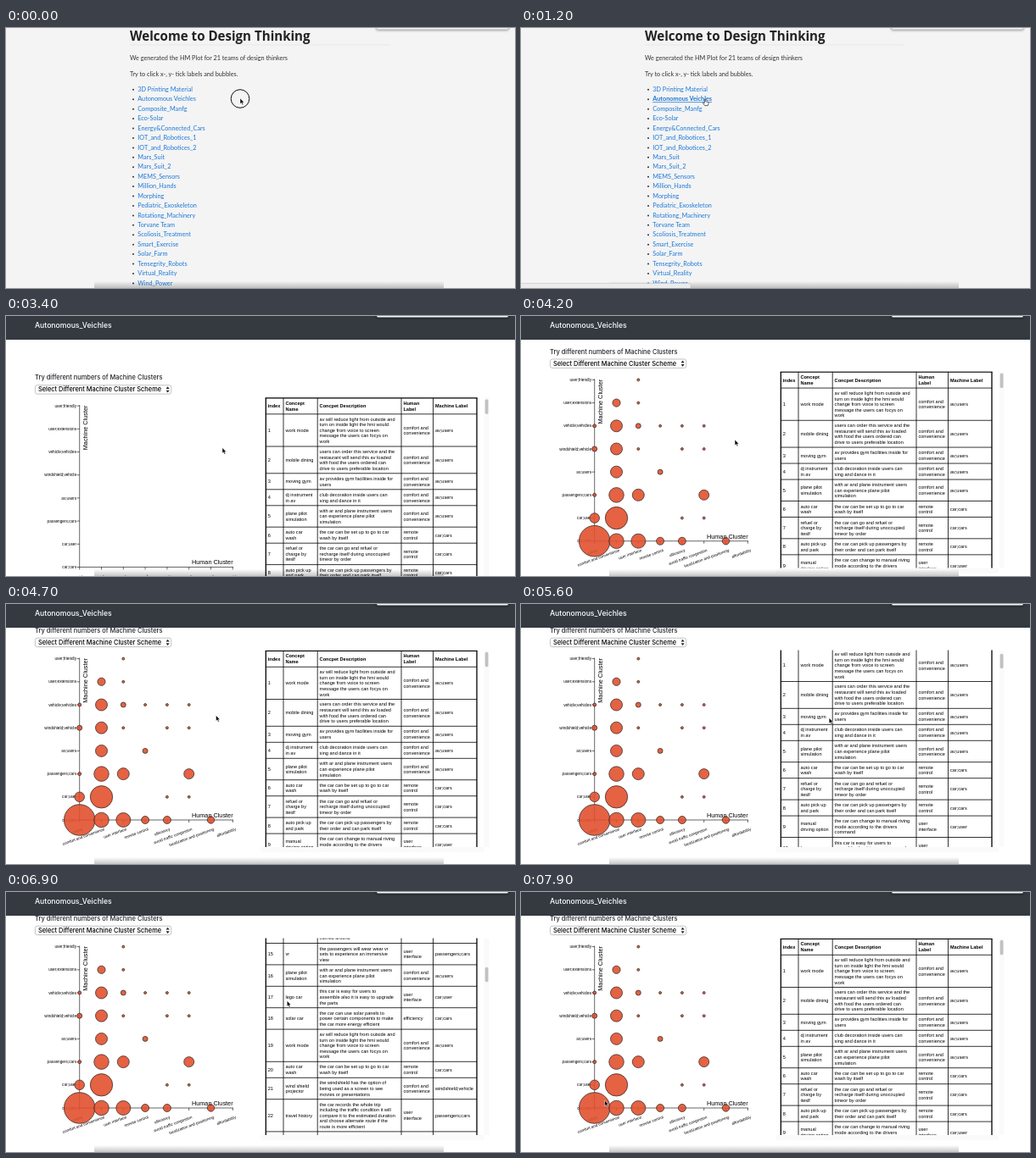
Write an HTML page that moves like this. It is 600 by 307 pixels and loops after 8000 ms.

```html
<!DOCTYPE html>
<html lang="en">
<head>
<meta charset="utf-8">
<title>Design Thinking</title>
<style>
html, body { margin: 0; width: 100%; height: 100%; overflow: hidden; background: #fff; }
svg { display: block; width: 600px; height: 307px; }
text { white-space: pre; }
.lato { font-family: Lato, sans-serif; }
.open { font-family: "Open Sans", sans-serif; }
.inter { font-family: Inter, sans-serif; font-weight: 500; }
.arial { font-family: "Liberation Sans", Arial, sans-serif; }
.bold { font-weight: 700; }
.hover { font-weight: 700; text-decoration: underline; }
</style>
</head>
<body>
<svg id="stage" viewBox="0 0 600 307" xmlns="http://www.w3.org/2000/svg">
  <defs>
    <clipPath id="pane"><rect x="300" y="54.6" width="258" height="232.4"/></clipPath>
    <linearGradient id="dock" x1="0" y1="0" x2="0" y2="1">
      <stop offset="0" stop-color="#000" stop-opacity="0"/>
      <stop offset="1" stop-color="#000" stop-opacity=".22"/>
    </linearGradient>
    <filter id="soft" x="-10%" y="-200%" width="120%" height="500%"><feGaussianBlur stdDeviation="1.6"/></filter>
  </defs>
  <g id="home"></g>
  <g id="detail">
    <rect width="600" height="307" fill="#fff"/>
    <g id="body">
      <g id="chart"></g>
      <g clip-path="url(#pane)"><g id="table"></g></g>
      <rect x="563.5" y="54.6" width="6" height="232.4" fill="#fafafa"/>
      <rect id="thumb" x="564.7" width="3.8" height="17.5" rx="1.9" fill="#c1c1c1"/>
      <rect x="300" y="287" width="263" height="6" fill="#fafafa"/>
    </g>
    <g id="nav"></g>
  </g>
  <rect x="104" y="299" width="412" height="8" fill="url(#dock)"/>
  <rect x="436" y="-6" width="157" height="9" rx="3" fill="#000" opacity=".35" filter="url(#soft)"/>
  <rect x="437" y="-6" width="155" height="7.5" rx="2" fill="#f7f7f7"/>
  <g id="status">
    <rect x="-2" y="301.5" width="202" height="8" rx="1.5" fill="#ececec" stroke="#bbb" stroke-width=".5"/>
  </g>
  <circle id="ring" cx="276" cy="83.5" r="10.8" fill="none" stroke="#111" stroke-width="1"/>
  <g id="cursor">
    <path id="arrow" d="M0 0V6.6L1.5 5.3 2.6 7.8 3.8 7.3 2.7 4.9H4.7Z" fill="#000" stroke="#fff" stroke-width=".5"/>
    <path id="hand" d="M-.7 .4Q0-.7 .7 .4V2.8L3.7 3.5Q4.3 4 4 5.2L3.3 7.6H-.4L-2.6 4.6Q-2.5 3.5-1.5 4L-.7 4.7Z" fill="#fff" stroke="#222" stroke-width=".7"/>
  </g>
</svg>
<script>
const $ = id => document.getElementById(id);
const add = (id, html) => $(id).insertAdjacentHTML('beforeend', html);

// Text whose middle sits on cy.
const text = (str, x, cy, size, cls, color = '#000', extra = '') =>
  `<text x="${x}" y="${(cy + size * 0.35).toFixed(2)}" font-size="${size}" class="${cls}" fill="${color}" ${extra}>${str}</text>`;
const line = (x1, y1, x2, y2, w = 0.6) =>
  `<path d="M${x1} ${y1}L${x2} ${y2}" stroke="#000" stroke-width="${w}" fill="none"/>`;

function buildHome() {
  const teams = ('3D Printing Material,Autonomous Veichles,Composite_Manfg,Eco-Solar,Energy&amp;Connected_Cars,' +
    'IOT_and_Robotices_1,IOT_and_Robotices_2,Mars_Suit,Mars_Suit_2,MEMS_Sensors,Million_Hands,Morphing,' +
    'Pediatric_Exoskeleton,Rotationg_Machinery,Torvane Team,Scoliosis_Treatment,Smart_Exercise,Solar_Farm,' +
    'Tensegrity_Robots,Virtual_Reality,Wind_Power').split(',');
  let out = '<rect width="600" height="307" fill="#f4f4f4"/>' +
    text('Welcome to Design Thinking', 146, 9.3, 15.1, 'open bold', '#222') +
    '<rect x="146" y="19.6" width="306" height=".7" fill="#e2e2e2"/>' +
    text('We generated the HM Plot for 21 teams of design thinkers', 146, 35.2, 7.25, 'lato', '#333') +
    text('Try to click x-, y- tick labels and bubbles.', 146, 54, 7.25, 'lato', '#333');
  teams.forEach((name, i) => {
    const y = 72.4 + i * 11.43;
    out += `<circle cx="150" cy="${y + 0.4}" r="1" fill="#333"/>` +
      text(name, 155.3, y, 7.25, 'lato', '#1b78d8', i === 1 ? 'id="link"' : '');
  });
  add('home', out);
}

const X0 = 86.7, Y0 = 255, DX = 25.8, DY = 27.2;

function buildChart() {
  const rows = ['car;cars', 'car;user', 'passengers;cars', 'av;users', 'windshield;vehicle',
    'vehicle;vehicles', 'user;extensions', 'user;friendly'];
  const cols = ['safety', 'comfort and convenience', 'user interface', 'remote control', 'efficiency',
    'avoid traffic congestion', 'localization and positioning', 'affordability'];
  // Radii per row from the bottom, one per column.
  const sizes = [[18.3, 8.8, 8.5, 4.5, 4.5, 0, 4.2], [5.8, 13.2, 0, 0, 1.5, 1.5], [2, 8.8, 7, 0, 0, 6],
    [0, 7, 0, 3], [3, 7, 1.5, 0, 1.5, 1.5], [2, 7, 3, 1.5, 1.5, 1.5], [0, 4.6, 1.5], [0, 0, 1.5]];
  let out = text('Try different numbers of Machine Clusters', 34, 31.3, 7.45, 'inter', '#212529') +
    '<rect x="34.4" y="40.2" width="160.4" height="10.4" rx="2.4" fill="#fff" stroke="#aaa" stroke-width=".7"/>' +
    text('Select Different Machine Cluster Scheme', 38, 45.3, 7.4, 'inter') +
    '<path d="M188.6 44.6l2-2.8 2 2.8zM188.6 46.2l2 2.8 2-2.8z" fill="#222"/>' +
    line(X0, 63.5, X0, Y0) + line(X0, Y0, 268, Y0);
  rows.forEach((name, i) => {
    const y = Y0 - i * DY;
    out += line(X0 - 3, y, X0, y) + text(name, 83, y, 4.7, 'arial', '#000', 'text-anchor="end"');
  });
  cols.forEach((name, i) => {
    const x = X0 + i * DX;
    out += line(x, Y0, x, Y0 + 3) +
      `<g transform="translate(${x + 3.5} 265.5) rotate(-20)">${text(name, 0, 0, 4.7, 'arial', '#000', 'text-anchor="end"')}</g>`;
  });
  sizes.forEach((list, j) => list.forEach((r, i) => {
    if (r) out += `<circle class="dot" data-r="${r}" cx="${X0 + i * DX}" cy="${Y0 - j * DY}" r="0" fill="#e2512f" fill-opacity=".9" stroke="#222" stroke-width=".7"/>`;
  }));
  out += text('Human Cluster', 267.6, 249.3, 7.3, 'arial', '#000', 'text-anchor="end"') +
    `<g transform="translate(93 64) rotate(-90)">${text('Machine Cluster', 0, 0, 7.3, 'arial', '#000', 'text-anchor="end"')}</g>`;
  add('chart', out);
}

const COMFORT = 'comfort and|convenience', REMOTE = 'remote|control', UI = 'user|interface';
const concepts = {
  1: ['work mode', 'av will reduce light from outside and|turn on inside light the hmi would|change from voice to screen|message the users can focys on|work', COMFORT, 'av;users'],
  2: ['mobile dining', 'users can order this service and the|restaurant will send this av loaded|with food the users ordered can|drive to users preferable location', COMFORT, 'av;users'],
  3: ['moving gym', 'av provides gym facilities inside for|users', COMFORT, 'av;users'],
  4: ['dj instrument|in av', 'club decoration inside users can|sing and dance in it', COMFORT, 'av;users'],
  5: ['plane pilot|simulation', 'with ar and plane instrument users|can experience plane pilot|simulation', COMFORT, 'av;users'],
  6: ['auto car|wash', 'the car can be set up to go to car|wash by itself', REMOTE, 'car;cars'],
  7: ['refuel or|charge by|iteslf', 'the car can go and refuel or|recharge itself during unoccupied|timeor by order', REMOTE, 'car;cars'],
  8: ['auto pick up|and park', 'the car can pick up passengers by|their order and can park itself', REMOTE, 'car;cars'],
  9: ['manual|driving option', 'the car can change to manual riving|mode according to the drivers|command', UI, 'car;user'],
  10: ['lego car', 'this car is easy for users to|assemble also it is easy to upgrade|the parts', UI, 'car;user'],
  28: ['wind shield|projector', 'the windshield has the option of|being used as a screen to see|movies or presentations', COMFORT, 'windshield;vehicle'],
  29: ['sphere|wheels', 'the car is able to turn without|actually turning the wheels the|steering angle is 360 degrees', COMFORT, 'windshield;vehicle'],
  30: ['hidden|steering|wheel', 'the steering wheel will come out|from from the dashboard only when|the autonomous function is disabled', COMFORT, 'windshield;vehicle'],
  31: ['portable car', 'the car parts can be detached and|can be put into a suit case to be|carried around', 'efficiency', 'car;cars'],
  32: ['solar car', 'the car can use solar panels to|power certain components to make|the car more energy efficient', 'efficiency', 'car;cars'],
  33: ['travel history', 'the car records the whole trip|including the traffic condition it will|compare it to the estimated duration|and choose alternate route if the|route is more efficient', UI, 'passengers;cars'],
  34: ['smart|navigation|system', 'a smart navigation system for|autonomous cars to keep users|engaged informed', UI, 'passengers;cars'],
  35: ['ar windshield', 'the windshield with ar function|enables the passengers to explore a|world beyound reality', UI, 'passengers;cars'],
  36: ['vr', 'the passengers will wear wear vr|sets to experience an immersive|view', UI, 'passengers;cars']
};

let farScroll = 0;

function buildTable() {
  const edges = [306.3, 327, 367.2, 466, 503.5, 555];
  const top = 55.3, pool = Object.values(concepts);
  let y = top, out = '';
  const row = (cells, cls) => {
    const parts = cells.map(c => String(c).split('|'));
    const h = 6.2 + 6.4 * Math.max(...parts.map(p => p.length));
    parts.forEach((p, i) => p.forEach((s, k) => {
      out += text(s, edges[i] + 2.4, y + h / 2 + (k - (p.length - 1) / 2) * 6.6, 5.6, cls);
    }));
    y += h;
    out += line(edges[0], y, edges[5], y, 0.8);
    return y - h / 2;
  };
  row(['index', 'Concept|Name', 'Concpet Description', 'Human|Label', 'Machine Label'], 'arial bold');
  for (let n = 1; n <= 40; n++) {
    const mid = row([n, ...(concepts[n] || pool[n * 5 % pool.length])], 'arial');
    if (n === 28) farScroll = mid - 66;
  }
  edges.forEach((x, i) => { out += line(x, top, x, y, i % 5 ? 0.8 : 1.3); });
  add('table', out + line(edges[0] - 0.6, top, edges[5] + 0.6, top, 1.3));
}

buildHome();
buildChart();
buildTable();
add('nav', '<rect width="600" height="28" fill="#343a40"/>' + text('Autonomous_Veichles', 34, 11.3, 8.65, 'inter', '#fff'));
add('status', text('Waiting for ajax.googleapis.com...', 0.5, 304.8, 5.1, 'open', '#555', 'id="wait"'));
const dots = [...document.querySelectorAll('.dot')];

const clamp = v => Math.min(1, Math.max(0, v));
const smooth = v => v * v * (3 - 2 * v);
const ramp = (t, a, b) => smooth(clamp((t - a) / (b - a)));

// Value between [time, value] stops.
function follow(t, stops, col = 1, ease = v => v) {
  let i = 0;
  while (i < stops.length - 2 && t >= stops[i + 1][0]) i++;
  const a = stops[i], b = stops[i + 1];
  return a[col] + (b[col] - a[col]) * ease(clamp((t - a[0]) / (b[0] - a[0])));
}

const path = [[0, 276, 83], [300, 276, 83], [1200, 217, 84], [2000, 216, 85], [2500, 218.7, 97], [2800, 218.7, 97],
  [3400, 255, 155.5], [3900, 255, 155.5], [4600, 247.5, 131.5], [4800, 247.5, 131.5], [5400, 363, 134.5],
  [6600, 365, 133], [6800, 365, 133], [7200, 149, 104], [7900, 98.5, 246]];
const wheel = [[5400, 0], [5600, 21], [6000, farScroll * 0.45], [6400, farScroll * 0.92], [6600, farScroll],
  [6700, farScroll], [7100, 0], [8000, 0]];

const show = (id, on) => $(id).setAttribute('visibility', on ? 'visible' : 'hidden');
const move = (id, x, y) => $(id).setAttribute('transform', `translate(${x.toFixed(2)} ${y.toFixed(2)})`);

function draw(t) {
  const detail = t >= 2800, hover = t >= 1100 && !detail;
  $('home').style.display = detail ? 'none' : '';
  $('detail').style.display = detail ? '' : 'none';
  $('link').setAttribute('class', hover ? 'lato hover' : 'lato');
  show('status', hover);
  show('wait', hover && t >= 1900);
  $('ring').setAttribute('opacity', 1 - clamp((t - 100) / 200));

  move('body', 0, 41.5 * (1 - ramp(t, 3800, 4400)));
  const grow = ramp(t, 3500, 4000);
  dots.forEach(d => d.setAttribute('r', d.dataset.r * grow));

  const scroll = follow(t, wheel);
  move('table', 0, -scroll);
  $('thumb').setAttribute('y', 56.8 + 64 * scroll / farScroll);

  move('cursor', follow(t, path, 1, smooth), follow(t, path, 2, smooth));
  show('arrow', !hover);
  show('hand', hover);
}

const start = performance.now();
function tick() {
  const t = (performance.now() - start) % 8000;
  draw(Math.floor(t / 100) * 100);
  requestAnimationFrame(tick);
}
draw(0);
requestAnimationFrame(tick);
</script>
</body>
</html>
```
